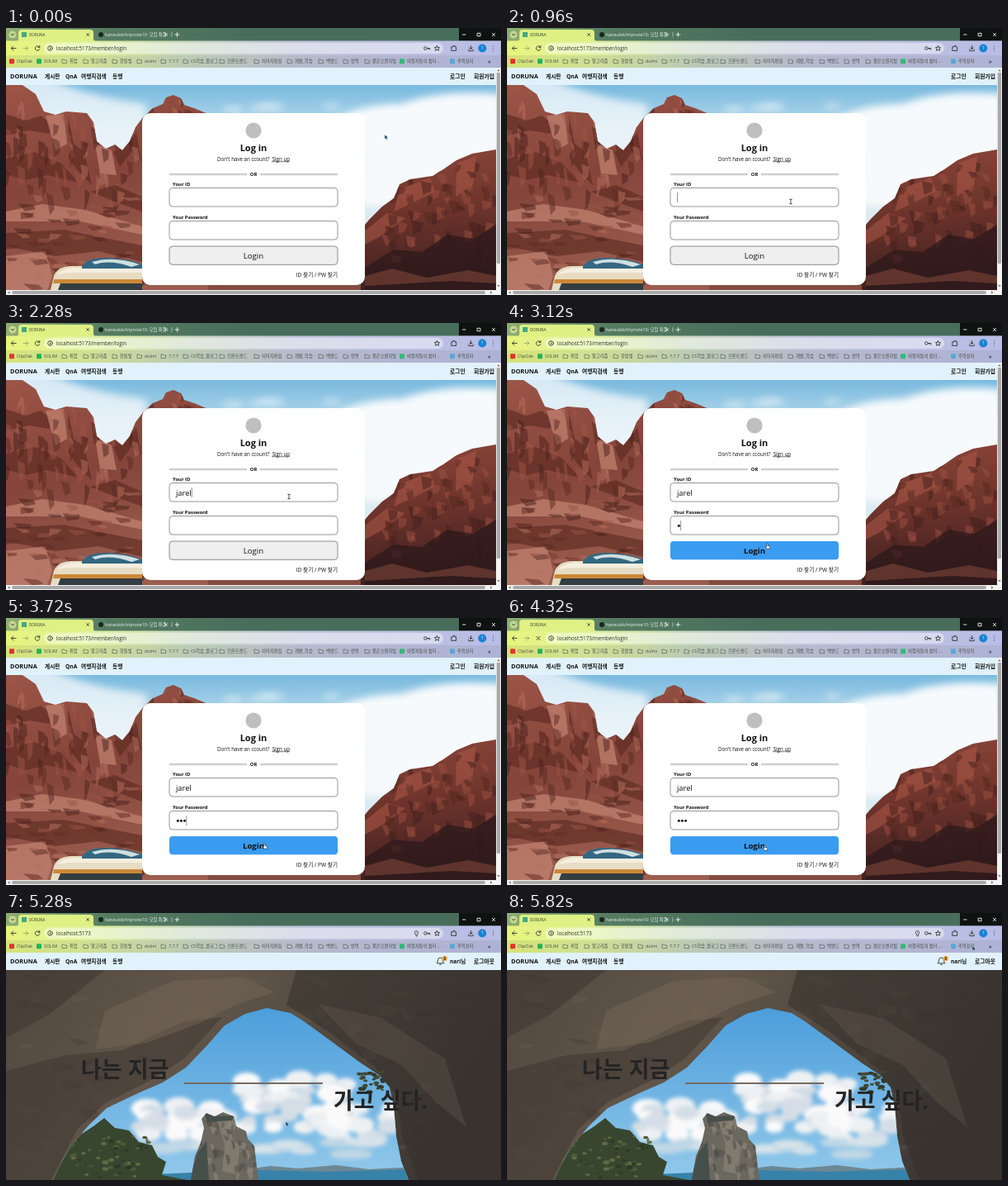
An HTML page for the animation above (5880 ms loop, 600 by 323 pixels).

```html
<!DOCTYPE html>
<html lang="ko">
<head>
<meta charset="utf-8">
<title>DORUNA</title>
<style>
html, body { margin: 0; width: 100%; height: 100%; overflow: hidden; background: #fff; }
svg { display: block; width: 100vw; height: 100vh; }
text { font-family: "Open Sans", "Noto Sans CJK KR", "Noto Sans CJK", sans-serif; white-space: pre; }
.line { fill: none; stroke: #34382f; stroke-width: .9; stroke-linecap: round; stroke-linejoin: round; }
.folder { fill: none; stroke: #4a5148; stroke-width: .6; stroke-linejoin: round; }
.field { fill: #fff; stroke: #8c8c8c; stroke-width: .9; }
.thumb { fill: #a9a9a9; }
</style>
</head>
<body>
<svg id="stage" viewBox="0 0 600 323" preserveAspectRatio="none">
  <defs>
    <linearGradient id="theme">
      <stop offset="0" stop-color="#e6f47c"/><stop offset=".16" stop-color="#e0f19c"/>
      <stop offset=".36" stop-color="#c9d9c0"/><stop offset=".6" stop-color="#c1c5dd"/>
      <stop offset="1" stop-color="#b9bce6"/>
    </linearGradient>
    <linearGradient id="strip">
      <stop offset="0" stop-color="#8fae72"/><stop offset=".2" stop-color="#557c61"/>
      <stop offset=".5" stop-color="#486d5b"/><stop offset="1" stop-color="#486d5b"/>
    </linearGradient>
    <linearGradient id="sky" x2="0" y2="1">
      <stop offset="0" stop-color="#79b9de"/><stop offset=".2" stop-color="#b4d9eb"/>
      <stop offset=".5" stop-color="#dcebf3"/>
    </linearGradient>
    <linearGradient id="red" x2=".25" y2="1">
      <stop offset="0" stop-color="#9c5547"/><stop offset=".5" stop-color="#85443a"/>
      <stop offset="1" stop-color="#9a5d4e"/>
    </linearGradient>
    <linearGradient id="maroon" x2=".1" y2="1">
      <stop offset="0" stop-color="#8c463a"/><stop offset=".5" stop-color="#6c332b"/>
      <stop offset="1" stop-color="#3f2020"/>
    </linearGradient>
    <linearGradient id="cave" x2="1" y2=".25">
      <stop offset="0" stop-color="#51483f"/><stop offset=".4" stop-color="#62564a"/>
      <stop offset=".7" stop-color="#51483f"/><stop offset="1" stop-color="#3f3935"/>
    </linearGradient>
    <linearGradient id="bay" x2="0" y2="1">
      <stop offset="0" stop-color="#4a9ddb"/><stop offset="1" stop-color="#92c9ea"/>
    </linearGradient>
    <filter id="soft" x="-20%" y="-40%" width="140%" height="180%"><feGaussianBlur stdDeviation="2.5"/></filter>
    <filter id="hazy" x="-20%" y="-40%" width="140%" height="180%"><feGaussianBlur stdDeviation="5"/></filter>
    <clipPath id="view"><path d="M0 69H594V317H0z"/></clipPath>
    <clipPath id="leftRock"><path id="leftShape" d="M0 69H20L36 80 46 101 60 105 73 101 98 103 106 114 110 137 121 146 132 141 141 148 150 137 157 120 166 108 178 97 190 92 194 84 203 81 212 85 216 93 228 97 245 104V317H0z"/></clipPath>
    <clipPath id="rightRock"><path id="rightShape" d="M430 244L440 232 456 216 470 206 477 189 490 183 517 179 530 171 546 160 565 152 594 147V317H430z"/></clipPath>
    <clipPath id="mouth"><path d="M57 323L70 296 82 278 100 257 122 236 160 218 190 205 218 187 243 161 265 136 290 122 316 115 345 121 361 131 390 152 428 180 452 196 465 211 470 234 473 270 479 300 488 323z"/></clipPath>
    <clipPath id="spire"><path id="spireShape" d="M224 323L229 294 236 278 240 260 237 249 243 242 253 246 263 241 276 246 279 258 291 264 293 273 301 282 306 323z"/></clipPath>
  </defs>

  <g id="loginPage">
    <g clip-path="url(#view)">
      <path fill="url(#sky)" d="M0 69H594V317H0z"/>
      <g id="wisps" fill="#f7fafc" filter="url(#hazy)">
        <path d="M395 112Q430 92 480 92Q525 74 600 80V215H430V150z"/>
        <path opacity=".75" d="M0 60H50Q100 84 170 92V165H0z"/>
      </g>
      <path fill="#844c40" d="M160 262H440V317H160z"/>
      <use href="#leftShape" fill="url(#red)"/>
      <g clip-path="url(#leftRock)">
        <g fill="#592821" opacity=".6">
          <path d="M0 104L24 112 42 106 58 118 52 128 28 124 0 130z"/>
          <path d="M75 106L82 140 95 150 104 190 90 176 76 158z"/>
          <path d="M0 158L34 150 66 163 88 187 50 178 24 184 0 177z"/>
          <path d="M150 138L158 126 164 160 152 150 138 168 130 150z"/>
          <path d="M102 198L132 190 165 204V222L140 213z"/>
          <path d="M0 248L70 244 165 263V283L112 270 60 276 0 264z"/>
        </g>
        <g fill="#c08270" opacity=".75">
          <path d="M48 106L70 104 74 140 60 148z"/>
          <path d="M108 140L128 148 134 178 114 176z"/>
          <path d="M0 222L44 213 96 220 165 240V250L90 234 0 234z"/>
          <path d="M0 276L48 270 56 300 50 317H0z"/>
        </g>
        <g id="leftFacets"></g>
      </g>
      <use href="#rightShape" fill="url(#maroon)"/>
      <g clip-path="url(#rightRock)">
        <g fill="#a75645" opacity=".6">
          <path d="M478 195L514 181 520 198 494 211 470 222z"/>
          <path d="M546 164L570 155 566 190 545 204z"/>
          <path d="M435 245L462 224 484 230 452 253 435 262z"/>
        </g>
        <g id="rightFacets"></g>
        <path fill="#2a171a" opacity=".7" d="M435 290L470 268 504 271 535 250 566 255 594 238V317H435z"/>
        <path fill="#7d4639" opacity=".6" d="M435 300L468 291 510 302 560 293 594 300V309L540 306 435 312z"/>
      </g>
      <path fill="#e7dcc4" d="M54 317L58 300Q62 289 78 288H165V317z"/>
      <path fill="#cc8839" d="M58 304H165V309H57z"/>
      <path fill="#333d42" d="M66 309H165V317H63z"/>
      <path fill="#f6efdf" d="M62 298Q70 290 84 290H165V296H76z"/>
      <path fill="#356782" d="M92 288Q99 277 124 278T165 286V291H92z"/>
      <path fill="#cfe0e0" d="M104 283Q130 275 162 286L152 289Q126 280 108 286z"/>
    </g>
    <rect x="165" y="103" width="270" height="208" rx="10" fill="#fff"/>
    <circle cx="300" cy="124" r="9.6" fill="#bfbfbf"/>
    <path d="M198 177H292M308 177H402" stroke="#cfcfcf" stroke-width="2.4"/>
    <rect class="field" x="198" y="193.5" width="204" height="22.5" rx="4"/>
    <rect class="field" x="198" y="233.5" width="204" height="22.5" rx="4"/>
    <rect id="button" x="198" y="264" width="204" height="22.3" rx="4"/>
    <path d="M322 161.7H344" stroke="#222" stroke-width=".6"/>
    <g id="loginText"></g>
    <g id="dots" fill="#111"></g>
    <path id="caret" stroke="#777" stroke-width=".8"/>
    <path fill="#f3f3f3" d="M594 69H600V323H0V317H594z"/>
    <rect class="thumb" x="594.8" y="60" width="4.2" height="225" rx="1.5"/>
    <rect class="thumb" x="7" y="318" width="574" height="4" rx="2"/>
    <path fill="#777" d="M4.5 318.2V321.8L2 320zM587 318.2V321.8L589.5 320zM595.2 311H598.8L597 313.3z"/>
  </g>

  <g id="homePage">
    <path fill="url(#cave)" d="M0 69H600V323H0z"/>
    <g id="caveFacets"></g>
    <path fill="#3e3832" opacity=".55" d="M0 69H120L52 123 0 151zM0 191L72 172 142 166 215 131 262 126 216 176 178 201 120 230 86 262 55 323H0z"/>
    <path fill="#776958" opacity=".45" d="M120 118L203 82 288 78 326 96 278 111 235 133 171 157 108 165z"/>
    <path fill="#332e2b" opacity=".5" d="M352 69H600V323H500L480 270 474 221 448 187 390 143 340 111z"/>
    <path fill="#665a4e" opacity=".35" d="M378 110L455 127 532 176 558 259 520 228 480 184 424 158z"/>
    <g clip-path="url(#mouth)">
      <path fill="url(#bay)" d="M50 110H495V323H50z"/>
      <g id="clouds" filter="url(#soft)"></g>
      <path fill="#6c8793" d="M285 311L320 306 354 309 400 305 440 310 495 307V323H285z"/>
      <path fill="#3682a8" d="M180 316L300 311 390 313 495 310V323H180z"/>
      <use href="#spireShape" fill="#6b6860"/>
      <g clip-path="url(#spire)">
        <path fill="#8b8275" opacity=".7" d="M256 250L272 249 274 273 284 282 279 316 262 312 265 280z"/>
        <g id="spireFacets"></g>
        <path fill="#46504a" d="M240 241L251 246 277 245 274 251 244 253zM232 290L243 276 246 323H222z"/>
      </g>
      <path fill="#39462f" d="M55 323L84 272 106 258 119 248 132 260 149 263 161 277 177 281 184 295 194 301 189 317 220 323z"/>
      <g id="leaves"></g>
    </g>
    <g id="bush"></g>
    <path d="M216 206H384" stroke="#766b65" stroke-width="2"/>
    <g id="homeText"></g>
  </g>

  <g id="browser">
    <path fill="url(#strip)" d="M0 0H600V16H0z"/>
    <path fill="#0e1211" d="M549 0H600V15.5H549z"/>
    <path fill="url(#theme)" d="M0 15.5H600V48H0z"/>
    <path fill="#66705f" opacity=".13" d="M0 33H600V48H0z"/>
    <path fill="#dff084" d="M12 16Q15 16 15 13V6Q15 2 19 2H102Q106 2 106 6V13Q106 16 109 16z"/>
    <circle cx="8" cy="8" r="4.6" fill="#d5e69a" opacity=".75"/>
    <path class="line" d="M6.2 7.2L8 9 9.8 7.2M97.8 6.6L100.6 9.4M100.6 6.6L97.8 9.4"/>
    <rect id="favicon" x="19" y="5" width="6" height="6" fill="#42a883"/>
    <circle cx="115" cy="8" r="3" fill="#1b2420"/>
    <g class="line" style="stroke:#f0f4f0">
      <path d="M192.8 6.6L195.6 9.4M195.6 6.6L192.8 9.4M205 8H209.8M207.4 5.6V10.4"/>
      <path opacity=".6" d="M201 5.5V10.5"/>
      <path d="M553.5 8H557M571.5 6.3H575V9.8H571.5zM589.4 6.4L592.6 9.6M592.6 6.4L589.4 9.6"/>
    </g>
    <rect x="46" y="18" width="484" height="13" rx="6.5" fill="#fff" opacity=".42"/>
    <g class="line">
      <path d="M12 24.5H6.4M8.8 22L6.3 24.5 8.8 27"/>
      <path opacity=".4" d="M21 24.5H26.6M24.2 22L26.7 24.5 24.2 27"/>
      <path id="reload" d="M40.5 23A2.8 2.8 0 1 0 40.8 25.5M40.8 21.5V23.5H38.8"/>
      <path id="stop" d="M35.8 22.3L40.2 26.7M40.2 22.3L35.8 26.7"/>
      <circle cx="53.5" cy="24.5" r="2.8"/><path d="M53.5 24.4V25.8M53.5 23V23.1"/>
      <path id="pin" d="M497.5 28L495.6 24.5A2.1 2.1 0 1 1 499.4 24.5zM497.5 23.4V23.5"/>
      <path id="key" d="M510.2 24.5A1.8 1.8 0 1 0 506.6 24.5A1.8 1.8 0 1 0 510.2 24.5H513.8V26M512 24.5V25.7"/>
      <path d="M522.5 21.5L523.4 23.5 525.6 23.7 523.9 25.2 524.5 27.4 522.5 26.2 520.5 27.4 521.1 25.2 519.4 23.7 521.6 23.5z"/>
      <path d="M540.2 22.8H542V21.5H544V22.8H545.6V27.4H540.2z"/>
      <path d="M563.5 21.5V25.5M561.7 23.8L563.5 25.6 565.3 23.8M560.8 26V27.7H566.2V26"/>
    </g>
    <circle cx="577.3" cy="24.5" r="5" fill="#1684d2"/>
    <path d="M590.5 22V22.1M590.5 24.5V24.6M590.5 27V27.1" class="line"/>
    <g id="bookmarks"></g>
    <path fill="#e1f2fd" d="M0 48H600V69H0z"/>
  </g>
  <g id="navEdge">
    <path fill="#f3f3f3" d="M594 48H600V69H594z"/>
    <path fill="#777" d="M595.2 52.3H598.8L597 50z"/>
    <path class="thumb" d="M594.8 54H599V69H594.8z"/>
  </g>
  <g id="labels"></g>
  <g id="member">
    <path class="line" d="M522.3 60.5Q523.6 59.3 523.6 57Q523.6 54 526.5 54T529.4 57Q529.4 59.3 530.7 60.5zM525.4 62.2H527.6"/>
    <circle cx="531.8" cy="55" r="3.2" fill="#f1b34e"/>
  </g>
  <g id="guest"></g>

  <g id="cursor">
    <path id="arrow" fill="#173b60" stroke="#e9f5ff" stroke-width=".35" d="M-1-3L-1 2.4 .4 1.3 1.3 3.2 2.3 2.8 1.5 .9 3.2 .7z"/>
    <path id="beam" fill="none" stroke="#222" stroke-width=".8" d="M-1.7-2.7H1.7M0-2.7V2.7M-1.7 2.7H1.7"/>
    <path id="hand" fill="#fff" stroke="#16344f" stroke-width=".7" d="M-1.2-3Q-.2-3.8 .2-2.8V-.6L2.4 0Q3 .3 2.8 1.2L2.2 3.3H-.7L-2.6 1Q-2.4 0-1.2 .7z"/>
  </g>
</svg>
<script>
const NS = "http://www.w3.org/2000/svg";
const LOOP = 5880, STEP = 60;
const HOME_AT = 4500, LOAD_AT = 4200;
const $ = id => document.getElementById(id);

function add(parent, tag, attrs, content) {
  const el = document.createElementNS(NS, tag);
  for (const key in attrs) el.setAttribute(key, attrs[key]);
  if (content !== undefined) el.textContent = content;
  $(parent).appendChild(el);
  return el;
}

// y is the middle of the line
function label(parent, content, x, y, size, opt = {}) {
  return add(parent, "text", {
    x, y: y + size * .36, "font-size": size, fill: opt.fill || "#111",
    "font-weight": opt.bold ? 700 : 400, "text-anchor": opt.anchor || "start"
  }, content);
}

function show(id, on) { $(id).style.display = on ? "" : "none"; }

let seed = 11;
function rand(lo, hi) {
  seed = (seed * 16807) % 2147483647;
  return lo + (hi - lo) * seed / 2147483647;
}

function puffs(parent, count, [x0, x1], [y0, y1], [r0, r1], fills, flat = .6) {
  for (let i = 0; i < count; i++) {
    const r = rand(r0, r1);
    add(parent, "ellipse", {
      cx: rand(x0, x1), cy: rand(y0, y1), rx: r, ry: r * flat,
      fill: fills[i % fills.length]
    });
  }
}

// irregular slabs of about w by h
function facets(parent, count, [x0, x1], [y0, y1], w, h, fills, opacity = .5) {
  for (let i = 0; i < count; i++) {
    const x = rand(x0, x1), y = rand(y0, y1), a = rand(.4, 1) * w, b = rand(.4, 1) * h;
    const skew = rand(-.3, .3) * w;
    add(parent, "path", {
      d: `M${x} ${y}l${a} ${b * .2} ${skew} ${b * .7} ${-a * .7} ${b * .3}z`,
      fill: fills[i % fills.length], opacity
    });
  }
}

// scenery
puffs("wisps", 5, [235, 420], [90, 102], [10, 20], ["#e3f1f8"], .22);
const redTones = ["#4a201c", "#b5705f", "#5c2a23", "#9c5444"];
facets("leftFacets", 70, [-5, 160], [72, 200], 10, 24, redTones);
facets("leftFacets", 16, [168, 235], [82, 104], 7, 12, redTones);
facets("leftFacets", 60, [-10, 160], [200, 310], 24, 8, redTones);
facets("rightFacets", 75, [430, 590], [150, 275], 14, 16, ["#421e1c", "#9c5041", "#54281f"]);
facets("caveFacets", 70, [-10, 590], [69, 310], 32, 14, ["#3c352f", "#6d6153"], .28);
facets("spireFacets", 45, [225, 300], [244, 315], 8, 12, ["#4c4b45", "#938a7c", "#5b5850"], .6);
const cloud = ["#eef1f3", "#d5dee6", "#fafafa"];
puffs("clouds", 26, [135, 285], [232, 268], [9, 20], cloud);
puffs("clouds", 20, [285, 350], [203, 262], [9, 18], cloud);
puffs("clouds", 24, [345, 430], [198, 260], [9, 19], cloud);
puffs("clouds", 18, [400, 475], [235, 275], [9, 18], cloud);
puffs("clouds", 14, [100, 470], [277, 292], [14, 28], ["#bfd7e6", "#d7e3e9"], .25);
puffs("leaves", 60, [78, 175], [270, 320], [1.5, 4], ["#4b5a38", "#2d3927", "#606a45"]);
puffs("bush", 30, [426, 460], [192, 217], [1.5, 4], ["#343a2a", "#454a34"]);

// browser chrome
label("browser", "DORUNA", 28, 8, 4.6, { fill: "#30382a" });
label("browser", "haneulok/tripnote10: 모임 최종", 120, 8, 5.3, { fill: "#eef3ee" });
const address = label("browser", "", 61, 24.5, 6.2, { fill: "#2c302c" });
label("browser", "T", 577.3, 24.5, 4.5, { fill: "#d9eefa", anchor: "middle" });

const ink = { fill: "#454c46" };
const sites = [[7, "#e5322d", "ClipOak"], [40, "#24b457", "SOLIM"],
  [480, "#35b877", "여행자들의 쉼터 …"], [541, "#5aa6d8", "추억상자"]];
for (const [x, fill, name] of sites) {
  add("bookmarks", "rect", { x: x - 3, y: 37.2, width: 6, height: 6, rx: 1, fill });
  label("bookmarks", name, x + 6, 40.3, 5.3, ink);
}
const folders = [[70, "취업"], [96, "알고리즘"], [131, "한들빛"], [161, "dulmi"], [190, "7.7.7"],
  [217, "CS학습_블로그"], [261, "프론트엔드"], [303, "이미지편집"], [343, "개발_학습"],
  [381, "백엔드"], [411, "번역"], [437, "붉은오렌지빛"]];
for (const [x, name] of folders) {
  add("bookmarks", "path", {
    class: "folder",
    d: `M${x - 2} 38H${x + .3}L${x + 1.2} 39H${x + 3.6}V42.6H${x - 2}z`
  });
  label("bookmarks", name, x + 7, 40.3, 5.3, ink);
}
label("bookmarks", "»", 584, 40, 7);

// site header
const bold = { bold: true };
label("labels", "DORUNA", 5, 58.5, 7.4, bold);
[["게시판", 47], ["QnA", 72], ["여행지검색", 91], ["동행", 129]]
  .forEach(([name, x]) => label("labels", name, x, 58.5, 6.7, bold));
label("guest", "로그인", 538, 58.5, 6.8, bold);
label("guest", "회원가입", 567, 58.5, 6.8, bold);
label("member", "nari님", 538, 58.5, 6.5, bold);
label("member", "로그아웃", 567, 58.5, 6.8, bold);
label("member", "0", 531.8, 55, 4.3, { bold: true, anchor: "middle" });

// login card
label("loginText", "Log in", 300, 145, 11, { bold: true, anchor: "middle" });
label("loginText", "Don't have an ccount?", 256, 159, 6.2);
label("loginText", "Sign up", 344, 159, 6.2, { anchor: "end" });
label("loginText", "OR", 300, 177.2, 5.8, { bold: true, anchor: "middle" });
label("loginText", "Your ID", 202, 189, 5.9, bold);
label("loginText", "Your Password", 202, 229, 5.8, bold);
label("loginText", "ID 찾기 / PW 찾기", 402, 299, 6.6, { anchor: "end" });
const login = label("loginText", "Login", 300, 275.5, 9.6, { anchor: "middle" });
const idText = label("loginText", "", 206, 205.5, 9.3);
const dots = [0, 1, 2].map(i => add("dots", "circle", { cx: 208.3 + i * 4.1, cy: 245.3, r: 1.5 }));

// home page
label("homeText", "나는 지금", 91, 189, 27, { bold: true, fill: "#242424" });
label("homeText", "가고 싶다.", 397, 227, 27, { bold: true, fill: "#242424" });

const USER = "jarel";
const idKeys = [1260, 1440, 1620, 1860, 2040];
const passKeys = [3060, 3300, 3540];
const ID_FOCUS = 840, PASS_FOCUS = 2640;
const path = [[0, 460, 132], [300, 460, 132], [780, 344, 210], [2400, 343, 210],
  [2940, 316, 270], [3360, 316, 270], [3900, 313, 278], [4320, 313, 278],
  [4740, 314, 280], [5160, 314, 280], [5760, 565, 43], [LOOP, 565, 43]];

function pointer(t) {
  const i = path.findIndex(p => p[0] > t);
  const [t0, x0, y0] = path[i - 1], [t1, x1, y1] = path[i];
  const k = (t - t0) / (t1 - t0), e = k * k * (3 - 2 * k);
  return [x0 + (x1 - x0) * e, y0 + (y1 - y0) * e];
}

function drawCaret(t, idCount, passCount) {
  const inPass = t >= PASS_FOCUS;
  const events = inPass ? [PASS_FOCUS, ...passKeys] : [ID_FOCUS, ...idKeys];
  const last = Math.max(...events.filter(k => k <= t));
  show("caret", t >= ID_FOCUS && t < LOAD_AT && (t - last) % 1060 < 530);
  const x = inPass ? 206.5 + passCount * 4.1 : 206.5 + (idCount ? idText.getComputedTextLength() : 0);
  $("caret").setAttribute("d", `M${x} ${inPass ? 239 : 199}v12`);
}

function render(t) {
  const home = t >= HOME_AT, loading = t >= LOAD_AT && !home;
  const [x, y] = pointer(t);
  const inside = (top, bottom) => !home && x > 198 && x < 402 && y > top && y < bottom;
  const hover = inside(264, 287);
  const typing = inside(193, 216) || inside(233, 256);
  const idCount = idKeys.filter(k => k <= t).length;
  const passCount = passKeys.filter(k => k <= t).length;

  for (const id of ["loginPage", "guest", "navEdge"]) show(id, !home);
  for (const id of ["homePage", "member", "pin"]) show(id, home);
  show("favicon", !loading);
  show("reload", !loading);
  show("stop", loading);
  show("key", !idCount || t >= PASS_FOCUS);
  address.textContent = "localhost:5173" + (home ? "" : "/member/login");

  idText.textContent = USER.slice(0, idCount);
  dots.forEach((dot, i) => dot.style.display = i < passCount ? "" : "none");
  if (!home) drawCaret(t, idCount, passCount);

  $("button").setAttribute("fill", hover ? "#3a9cf0" : "#efefef");
  $("button").setAttribute("stroke", hover ? "none" : "#8c8c8c");
  login.setAttribute("font-weight", hover ? 700 : 400);

  show("arrow", !hover && !typing);
  show("beam", typing);
  show("hand", hover);
  $("cursor").setAttribute("transform", `translate(${x} ${y})`);
}

function tick() {
  const t = performance.now() % LOOP;
  render(Math.floor(t / STEP) * STEP);
  requestAnimationFrame(tick);
}
tick();
</script>
</body>
</html>
```
